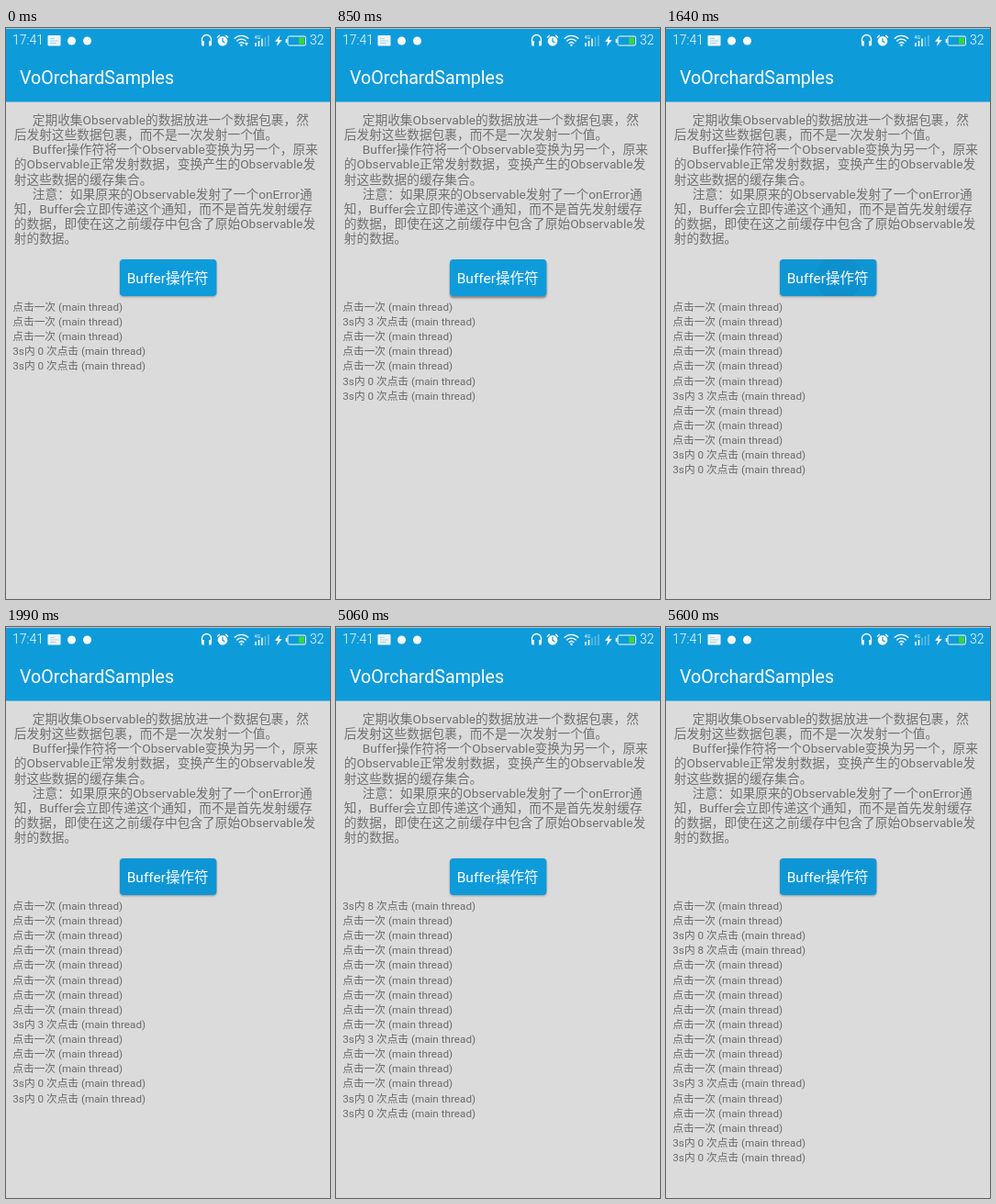
An HTML page for the animation above (8 s loop, 353 by 622 pixels).

```html
<!DOCTYPE html>
<html lang="zh">
<head>
<meta charset="utf-8">
<style>
html, body { margin: 0; width: 100%; height: 100%; overflow: hidden; background: #dbdbdb; }
svg { display: block; width: 100vw; height: 100vh; }
text { font-family: Roboto, "Noto Sans CJK SC", "Noto Sans CJK", sans-serif; white-space: pre; }
#intro { font-size: 13.7px; fill: #707070; }
#log { font-size: 11.7px; fill: #6a6a6a; }
.bar { font-size: 14px; font-weight: 300; fill: #fff; }
.line { fill: none; stroke: #fff; stroke-width: 1.3; stroke-linecap: round; }
</style>
</head>
<body>
<svg viewBox="0 0 353 622">
  <defs>
    <clipPath id="face"><rect x="124" y="252" width="105.4" height="40" rx="4"/></clipPath>
    <filter id="soft"><feGaussianBlur stdDeviation="1"/></filter>
  </defs>
  <rect width="353" height="622" fill="#dbdbdb"/>
  <rect width="353" height="80.5" fill="#0e9bda"/>
  <rect width="353" height="1" fill="#b9c3c9"/>

  <g id="status">
    <text class="bar" x="7" y="18.3">17:41</text>
    <rect x="45.5" y="8" width="14" height="11.5" rx="1" fill="#eef6fa"/>
    <path d="M48 11.5h5M48 14h9M48 16.5h7" stroke="#a9d3e8"/>
    <circle cx="71.5" cy="14" r="4.5" fill="#fff"/>
    <circle cx="88.5" cy="14" r="4.5" fill="#fff"/>
    <path class="line" d="M213.5 15v-2.5a5 5 0 0 1 10 0v2.5"/>
    <path d="M213 14h2.8v5.5h-1.3q-1.5 0-1.5-1.5zM224 14h-2.8v5.5h1.3q1.5 0 1.5-1.5z" fill="#fff"/>
    <circle cx="236" cy="14.3" r="5.3" fill="#fff"/>
    <path class="line" d="M230.4 10.2l2-2M241.6 10.2l-2-2"/>
    <path d="M236 11v3.6l2.4 1.3" fill="none" stroke="#0e9bda" stroke-width="1.2"/>
    <path class="line" d="M249.2 11.3a10.5 10.5 0 0 1 14.6 0M251.7 14a7 7 0 0 1 9.6 0M254.1 16.6a3.6 3.6 0 0 1 4.8 0"/>
    <circle cx="256.5" cy="18.8" r="1.2" fill="#fff"/>
    <path id="traffic" d="M260 16h4l-2 3.4z" fill="#fff"/>
    <text x="270.5" y="12" font-size="5.5" fill="#fff">4G</text>
    <path d="M272 16v4M275.5 14v6" stroke="#fff" stroke-width="1.5"/>
    <path id="signal" d="M279 11.5v8.5" stroke="#fff" stroke-width="1.5"/>
    <path d="M282.5 10v10M286 8v12" stroke="#fff" stroke-width="1.5" opacity=".35"/>
    <path d="M298.5 8l-5.5 6.8h3.2l-1.2 5.2 5.7-7h-3.3z" fill="#fff"/>
    <rect x="307" y="9" width="19.5" height="10" rx="1.5" fill="none" stroke="#fff"/>
    <rect x="304.7" y="12" width="1.8" height="4" fill="#fff"/>
    <rect x="319" y="10.5" width="6" height="7" fill="#37d53c"/>
    <text class="bar" x="331" y="18.3">32</text>
  </g>

  <text x="15" y="61" font-size="19.6" fill="#fff">VoOrchardSamples</text>
  <g id="intro"></g>

  <rect id="shade" x="124" y="253" width="105.4" height="40" rx="4" filter="url(#soft)"/>
  <g clip-path="url(#face)">
    <rect x="124" y="252" width="106" height="40" fill="#0e9bda"/>
    <rect id="tint" x="124" y="252" width="106" height="40" fill="#104a78"/>
    <circle id="ripple" cx="188" cy="272" r="25" fill="#104a78"/>
  </g>
  <text x="131.7" y="277.9" font-size="15.5" fill="#fff">Buffer操作符</text>

  <g id="log"></g>
</svg>
<script>
const LOOP = 8000;
const $ = id => document.getElementById(id);

function addText(parent, x, y, str = '') {
  const el = document.createElementNS('http://www.w3.org/2000/svg', 'text');
  el.setAttribute('x', x);
  el.setAttribute('y', Math.round(y));
  el.textContent = str;
  return parent.appendChild(el);
}

// A leading tab marks an indented line
[
  '\t定期收集Observable的数据放进一个数据包裹，然',
  '后发射这些数据包裹，而不是一次发射一个值。',
  '\tBuffer操作符将一个Observable变换为另一个，原来',
  '的Observable正常发射数据，变换产生的Observable发',
  '射这些数据的缓存集合。',
  '\t注意：如果原来的Observable发射了一个onError通',
  '知，Buffer会立即传递这个通知，而不是首先发射缓存',
  '的数据，即使在这之前缓存中包含了原始Observable发',
  '射的数据。'
].forEach((s, i) => addText($('intro'), s[0] === '\t' ? 28.8 : 8.8, 105.3 + 16.06 * i, s.trim()));

const click = t => [t, '点击一次 (main thread)'];
const total = (t, n) => [t, `3s内 ${n} 次点击 (main thread)`];

const events = [
  total(0, 0), total(0, 0), click(0), click(0), click(0),
  total(500, 3),
  ...[770, 940, 1110, 1380, 1470, 1640, 1820, 1990].map(click),
  total(2160, 8), total(5240, 0),
  click(5420), click(5600)
];
const rows = events.map((_, i) => addText($('log'), 7.3, 308 + 16.12 * i));

const presses = [[590, 680], [770, 940], [1030, 1110], [1380, 1640], [5330, 5600]];
const within = (t, a, b) => t >= a && t < b;
const fade = (id, opacity) => $(id).setAttribute('opacity', opacity);

function render(t) {
  // Newest entry on top
  const shown = events.filter(e => e[0] <= t).reverse();
  rows.forEach((el, i) => {
    const str = shown[i] ? shown[i][1] : '';
    if (el.textContent !== str) el.textContent = str;
  });

  const down = presses.some(([a, b]) => within(t, a, b));
  $('shade').setAttribute('y', down ? 254.3 : 253);
  fade('shade', down ? .4 : .3);
  fade('tint', within(t, 1110, 2160) || t >= 5420 ? .06 : 0);
  fade('ripple', within(t, 1380, 1820) || within(t, 5330, 5600) ? .07 : 0);
  fade('traffic', t < 500 ? 1 : 0);
  fade('signal', t < 5060 ? 1 : .35);
}

const start = performance.now();
function tick() {
  render((performance.now() - start) % LOOP);
  requestAnimationFrame(tick);
}
tick();
</script>
</body>
</html>
```
